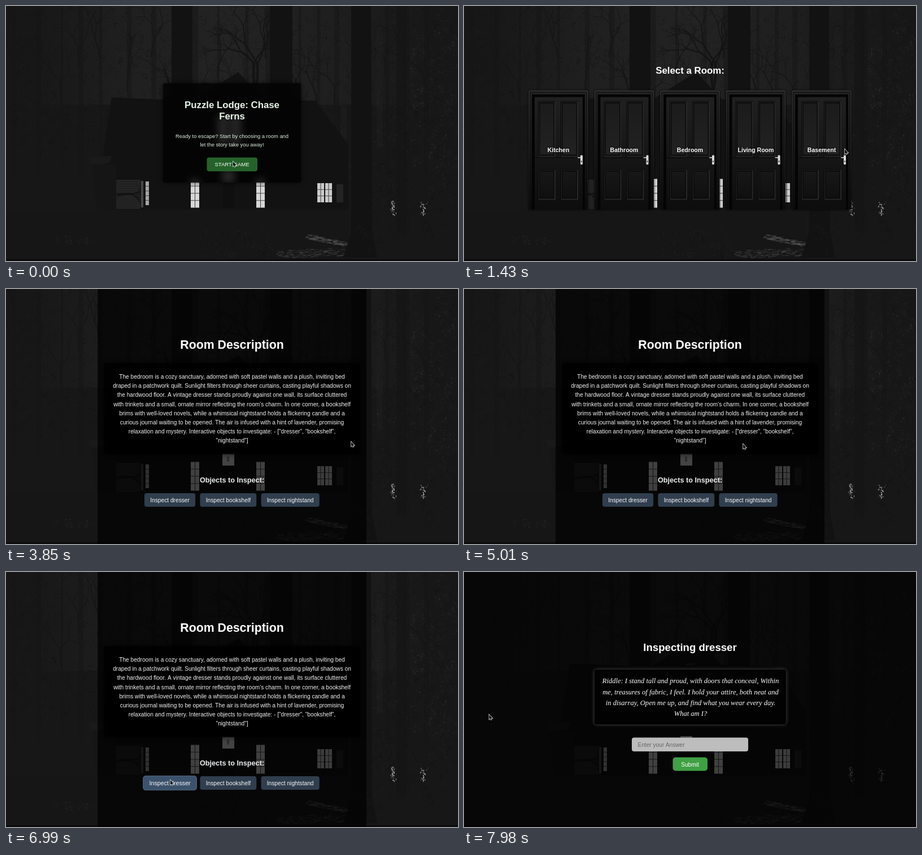
An HTML page with a canvas for the animation above (8 s loop, 800 by 452 pixels).

```html
<!DOCTYPE html>
<html lang="en">
<head>
<meta charset="utf-8">
<title>Room escape</title>
<style>
html, body { margin: 0; width: 100%; height: 100%; overflow: hidden; background: #181818; }
canvas { display: block; width: 800px; height: 452px; }
</style>
</head>
<body>
<canvas id="stage" width="800" height="452"></canvas>
<script>
const W = 800, H = 452, LOOP = 8000;
const ctx = document.getElementById('stage').getContext('2d');
const SANS = '"Liberation Sans", Arial, sans-serif';
const SERIF = '"Liberation Serif", "Times New Roman", serif';

const smooth = v => { v = Math.max(0, Math.min(1, v)); return v * v * (3 - 2 * v); };
const grey = (v, a = 1) => `rgba(${v},${v},${v},${a})`;

let seed = 7;
function rnd(a = 0, b = 1) {
  seed = (seed * 1664525 + 1013904223) % 4294967296;
  return a + (b - a) * seed / 4294967296;
}

// ---------- night-time house, drawn once ----------
function makeLayer(draw) {
  const layer = document.createElement('canvas');
  layer.width = W; layer.height = H;
  draw(layer.getContext('2d'));
  return layer;
}

function paintHouse(g) {
  const rect = (x, y, w, h, tone, alpha) => { g.fillStyle = grey(tone, alpha); g.fillRect(x, y, w, h); };
  const poly = (tone, ...points) => {
    g.fillStyle = grey(tone);
    g.beginPath();
    for (const [x, y] of points) g.lineTo(x, y);
    g.fill();
  };
  const branch = (x, y, angle, length, width, tone) => {
    if (width < 0.35) return;
    const bend = angle + rnd(-0.3, 0.3);
    const x2 = x + Math.cos(bend) * length, y2 = y + Math.sin(bend) * length;
    g.strokeStyle = grey(tone); g.lineWidth = width;
    g.beginPath(); g.moveTo(x, y);
    g.quadraticCurveTo(x + Math.cos(angle) * length / 2, y + Math.sin(angle) * length / 2, x2, y2);
    g.stroke();
    branch(x2, y2, bend + rnd(-0.7, 0), length * rnd(0.6, 0.95), width * 0.7, tone);
    branch(x2, y2, bend + rnd(0.1, 0.9), length * rnd(0.5, 0.9), width * 0.6, tone);
  };
  // small clumps of leaves scattered over an area
  const foliage = (count, x, y, w, h, low, high) => {
    for (let i = 0; i < count; i++) {
      const cx = x + rnd(0, w), cy = y + rnd(0, h), tone = Math.round(rnd(low, high));
      for (let k = 0; k < 7; k++)
        rect(cx + rnd(-5, 5), cy + rnd(-6, 6), rnd(0.7, 2.2), rnd(0.7, 2.5), tone, 0.5);
    }
  };
  const windowPane = (x, y, w, h, cols, rows, tone) => {
    rect(x, y, w, h, tone);
    for (let i = 1; i < cols; i++) rect(x + w * i / cols - 0.5, y, 1, h, 60);
    for (let i = 1; i < rows; i++) rect(x, y + h * i / rows - 0.5, w, 1, 70);
  };

  rect(0, 0, W, H, 23);
  const sky = g.createLinearGradient(60, 0, 740, 0);
  [24, 32, 35, 31, 24].forEach((tone, i) => sky.addColorStop(i / 4, grey(tone)));
  g.fillStyle = sky;
  g.fillRect(60, 0, 680, 175);
  foliage(650, 0, 0, 290, 260, 17, 35);
  foliage(300, 330, 0, 137, 160, 22, 42);
  foliage(850, 507, 0, 293, 350, 16, 42);
  foliage(170, 690, 40, 110, 250, 30, 54);
  for (let x = 10; x < W; x += rnd(30, 60)) {
    rect(x, 0, rnd(3, 11), 300, 20, 0.45);
    branch(x, rnd(90, 190), -1.57, 34, 2.6, 22);
  }
  for (const lean of [-1.75, -1.3]) branch(441, 150, lean, 48, 4.5, 20);
  for (const x of [593, 656]) {
    rect(x, 50, 10, 200, 30, 0.6);
    foliage(45, x + 2, 50, 6, 200, 20, 46);
  }

  poly(18, [187, 162], [330, 168], [411, 117], [456, 165], [548, 168], [606, 246], [606, 362], [180, 362], [172, 258]);
  poly(26, [145, 268], [188, 266], [183, 278], [150, 281]);
  poly(21, [152, 281], [195, 281], [195, 360], [160, 360]);
  rect(293, 0, 37, 172, 18);
  rect(467, 0, 40, 410, 18);
  rect(691, 0, 18, 400, 20, 0.7);
  rect(0, 361, 605, 90, 23, 0.9);
  foliage(130, 600, 320, 200, 100, 16, 32);
  foliage(110, 340, 395, 130, 50, 18, 40);
  foliage(14, 70, 412, 80, 5, 26, 52);

  rect(195, 308, 43, 52, 36);
  for (let y = 311; y < 360; y += 4) rect(195, y, 43, 1, 29);
  branch(196, 335, -0.1, 16, 5, 20);
  windowPane(239, 310, 4, 47, 1, 5, 72);
  windowPane(247, 311, 6, 42, 1, 5, 165);
  for (const x of [375, 398]) windowPane(x, 193, 17.5, 52, 2, 4, 220);
  for (const x of [327, 443]) windowPane(x, 306.5, 15, 51, 2, 4, 215);
  for (const x of [551, 565]) windowPane(x, 314, 12, 34, 2, 3, 203);
  rect(394, 162, 14, 3, 40);
  rect(383, 291, 21, 22, 225);
  rect(391, 297, 4, 9, 150);
  rect(384, 313, 20, 45, 15);
  rect(585, 316, 12, 32, 36);

  for (let i = 0; i < 60; i++)
    rect((i % 2 ? 685 : 738) + rnd(-1, 1) * rnd(0, 9), rnd(345, 370), rnd(0.7, 2), rnd(0.7, 3), Math.round(rnd(50, 220)));
  // lamp-lit path: two uneven bands of streaks
  for (let i = 0; i < 460; i++) {
    const k = rnd(), upper = i % 2;
    const x = upper ? 530 + 78 * k : 475 + 125 * k;
    const y = upper ? 406 + 17 * k + rnd(-3, 6) : 440 - 5 * k + rnd(-7, 7);
    rect(x, y, rnd(2, 9), rnd(0.6, 1.4), Math.round(rnd(20, upper ? 120 : 85)), 0.6);
  }
  poly(18, [611, 0], [646, 0], [648, 400], [657, 446], [597, 446], [611, 400]);
  foliage(35, 618, 365, 28, 70, 16, 36);
  rect(0, 449, W, 3, 11);
}

const backdrop = makeLayer(paintHouse);
const blurred = makeLayer(g => { g.filter = 'blur(7px)'; g.drawImage(backdrop, 0, 0); });

// ---------- shared drawing helpers ----------
function text(str, x, y, size, color = '#fff', { weight = '', family = SANS, align = 'center' } = {}) {
  ctx.font = `${weight} ${size}px ${family}`;
  ctx.textAlign = align;
  ctx.fillStyle = color;
  ctx.fillText(str, x, y + size * 0.358);
}
const bold = (str, y, size, color, x = 400) => text(str, x, y, size, color, { weight: 'bold' });

function box(x, y, w, h, radius, fill, shadow, blur = 0) {
  ctx.save();
  if (shadow) { ctx.shadowColor = shadow; ctx.shadowBlur = blur; }
  ctx.fillStyle = fill;
  ctx.beginPath(); ctx.roundRect(x, y, w, h, radius); ctx.fill();
  ctx.restore();
}

function scaled(x, y, scale, draw) {
  ctx.save();
  ctx.translate(x, y); ctx.scale(scale, scale);
  draw();
  ctx.restore();
}

function vertical(y1, y2, from, to) {
  const gradient = ctx.createLinearGradient(0, y1, 0, y2);
  gradient.addColorStop(0, grey(from)); gradient.addColorStop(1, grey(to));
  return gradient;
}

// ---------- pointer ----------
const MOVES = [ // start, end, x, y
  [550, 960, 166, 272], [960, 1300, 575, 262], [1370, 1430, 674, 254], [1430, 1900, 430, 273],
  [2260, 2480, 611, 271], [3910, 4680, 494, 275], [6400, 6900, 291, 369], [7700, 7960, 44.5, 253]];
const ARROW = new Path2D('M0 0V8L1.8 6.4 3 9 4.3 8.4 3.1 5.9H5.6Z');

function pointerAt(t) {
  let x = 402, y = 276;
  for (const [start, end, toX, toY] of MOVES) {
    const k = smooth((t - start) / (end - start));
    x += (toX - x) * k;
    y += (toY - y) * k;
  }
  return [x, y];
}

// share of the recent past in which the pointer was over an area: 0 to 1
function hover(t, since, x, y, w, h) {
  let hits = 0;
  for (let age = 70; age < 130; age += 6) {
    const [px, py] = pointerAt(t - age);
    if (t - age > since && Math.abs(px - x) < w / 2 && Math.abs(py - y) < h / 2) hits++;
  }
  return smooth(hits / 10);
}

function drawPointer(t) {
  ctx.save();
  ctx.translate(...pointerAt(t));
  ctx.strokeStyle = '#ddd'; ctx.lineWidth = 1.5; ctx.stroke(ARROW);
  ctx.fillStyle = '#0a0a0a'; ctx.fill(ARROW);
  ctx.restore();
}

// ---------- screens ----------
function startScreen() {
  box(278, 137, 244, 176, 4, '#080808', 'rgba(0,0,0,.7)', 9);
  ctx.save();
  ctx.beginPath(); ctx.roundRect(278, 137, 244, 176, 4); ctx.clip();
  ctx.drawImage(blurred, 0, 0);
  ctx.fillStyle = 'rgba(0,0,0,.8)'; ctx.fillRect(278, 137, 244, 176);
  ctx.restore();
  bold('Puzzle Lodge: Chase', 174.5, 16.8, '#e8f5e9');
  bold('Ferns', 194.5, 16.8, '#e8f5e9');
  text('Ready to escape? Start by choosing a room and', 400, 231, 9.35, '#dcebdc');
  text('let the story take you away!', 400, 246, 9.35, '#dcebdc');
  box(355.5, 268.5, 89.5, 24.5, 4, '#25622a');
  text('START GAME', 400, 281, 9.55, '#f4fff4');
}

const DOORS = ['Kitchen', 'Bathroom', 'Bedroom', 'Living Room', 'Basement'];

function drawPanel(x, y, w, h, top, bottom) {
  box(x, y, w, h, 0, '#060606');
  box(x + 1, y + 1, w - 1, h - 1, 0, grey(40));
  box(x + 2, y + 2, w - 4, h - 4, 0, grey(9));
  box(x + 3.5, y + 4, w - 7, h - 8, 0, vertical(y, y + h, top, bottom));
}

function drawDoor(label, lift) {
  box(-52.5, -106, 105, 211.5, [3, 3, 0, 0], vertical(-106, 105, 50, 14), grey(0, 0.8), 4 + 5 * lift);
  box(-51, -104, 102, 209.5, 2, vertical(-104, 105, 24, 10));
  box(-48.5, -101, 97, 206.5, 0, vertical(-101, 105, 40, 12));
  box(-47, -99, 94, 204.5, 0, '#040404');
  box(-42, -94, 85, 199.5, 0, vertical(-94, 105, 32, 13));
  for (const x of [-36, 4]) {
    drawPanel(x, -87, 31, 99, 27, 34);
    drawPanel(x, 34, 31, 54, 24, 15);
  }
  box(-42, 13, 85, 1, 0, '#080808');
  box(39, 9, 4, 16.5, 1, '#d8d8d8');
  box(34, 12.5, 7, 1.5, 1, '#ddd');
  box(40.2, 18.5, 1.5, 3, 0, '#333');
  ctx.save();
  ctx.shadowColor = '#000'; ctx.shadowBlur = 3;
  bold(label, 0, 10.55, '#fff', 0);
  ctx.restore();
}

function selectScreen(t) {
  bold('Select a Room:', 114, 16.85);
  DOORS.forEach((label, i) => {
    const x = 167 + 116.5 * i, lift = hover(t, 60, x, 255.5, 105, 211);
    scaled(x, 255.5, 1 + 0.05 * lift, () => drawDoor(label, lift));
  });
}

function loadingScreen(title, size) {
  bold(title, 206, size);
  text('Loading...', 400, 255.5, 8.75);
}

const STORY = [
  'The bedroom is a cozy sanctuary, adorned with soft pastel walls and a plush, inviting bed',
  'draped in a patchwork quilt. Sunlight filters through sheer curtains, casting playful shadows on',
  'the hardwood floor. A vintage dresser stands proudly against one wall, its surface cluttered',
  "with trinkets and a small, ornate mirror reflecting the room's charm. In one corner, a bookshelf",
  'brims with well-loved novels, while a whimsical nightstand holds a flickering candle and a',
  'curious journal waiting to be opened. The air is infused with a hint of lavender, promising',
  'relaxation and mystery. Interactive objects to investigate: - ["dresser", "bookshelf",',
  '"nightstand"]'];
const OBJECTS = ['dresser', 'bookshelf', 'nightstand'];

function inspectButtons(t) {
  let left = 245;
  for (const name of OBJECTS) {
    const label = 'Inspect ' + name;
    ctx.font = `10.2px ${SANS}`;
    const w = ctx.measureText(label).width + 20.5, x = left + w / 2;
    const lift = hover(t, 3080, x, 374, w, 24);
    scaled(x, 374, 1 + 0.05 * lift, () => {
      box(-w / 2, -12, w, 24, 4, lift > 0.5 ? '#3c526c' : '#303e4e');
      ctx.strokeStyle = `rgba(92,116,148,${lift})`; ctx.lineWidth = 0.8;
      ctx.beginPath(); ctx.roundRect(-w / 2, -12, w, 24, 4); ctx.stroke();
      text(label, 0, 0, 10.2, '#f5f7fa');
    });
    left += w + 8.3;
  }
}

function roomScreen(t) {
  ctx.save();
  ctx.globalAlpha = smooth((t - 3030) / 300);
  ctx.fillStyle = 'rgba(0,0,0,.7)'; ctx.fillRect(162, 0, 476, H);
  bold('Room Description', 98.5, 21.3);
  box(173, 131, 454, 162, 5, 'rgba(0,0,0,.8)', 'rgba(0,0,0,.8)', 9);
  STORY.forEach((line, i) => text(line, 400, 155.3 + 16.22 * i, 10.17, '#f0f4f0'));
  bold('Objects to Inspect:', 338, 12.7, '#eceff1');
  inspectButtons(t);
  ctx.restore();
}

const RIDDLE = [
  'Riddle: I stand tall and proud, with doors that conceal, Within',
  'me, treasures of fabric, I feel. I hold your attire, both neat and',
  'in disarray, Open me up, and find what you wear every day.',
  'What am I?'];

function riddleScreen(t) {
  ctx.fillStyle = grey(0, 0.7 * smooth((t - 7320) / 180));
  ctx.fillRect(0, 0, W, H);
  if (t < 7700) return loadingScreen('Inspecting dresser', 18.6);
  bold('Inspecting dresser', 133.5, 18.6);
  box(231, 173, 339, 97, 4, '#020202', 'rgba(110,110,110,.65)', 6);
  RIDDLE.forEach((line, i) =>
    text(line, 401, 193 + 19.1 * i, 12.55, '#fff', { weight: 'italic', family: SERIF }));
  box(297, 293.5, 206, 24.5, 4, '#bdbdbd');
  text('Enter your Answer', 307.5, 306, 10.1, '#666', { align: 'left' });
  box(369.5, 328.5, 61.5, 24, 5, '#3fa044');
  text('Submit', 400, 341, 10.2);
}

function frame(now) {
  const t = now % LOOP;
  ctx.drawImage(backdrop, 0, 0);
  if (t < 60) startScreen();
  else if (t < 2040) selectScreen(t);
  else if (t < 3080) loadingScreen('Select a Room:', 16.85);
  else if (t < 7370) roomScreen(t);
  else riddleScreen(t);
  drawPointer(t);
  requestAnimationFrame(frame);
}
requestAnimationFrame(frame);
</script>
</body>
</html>
```
